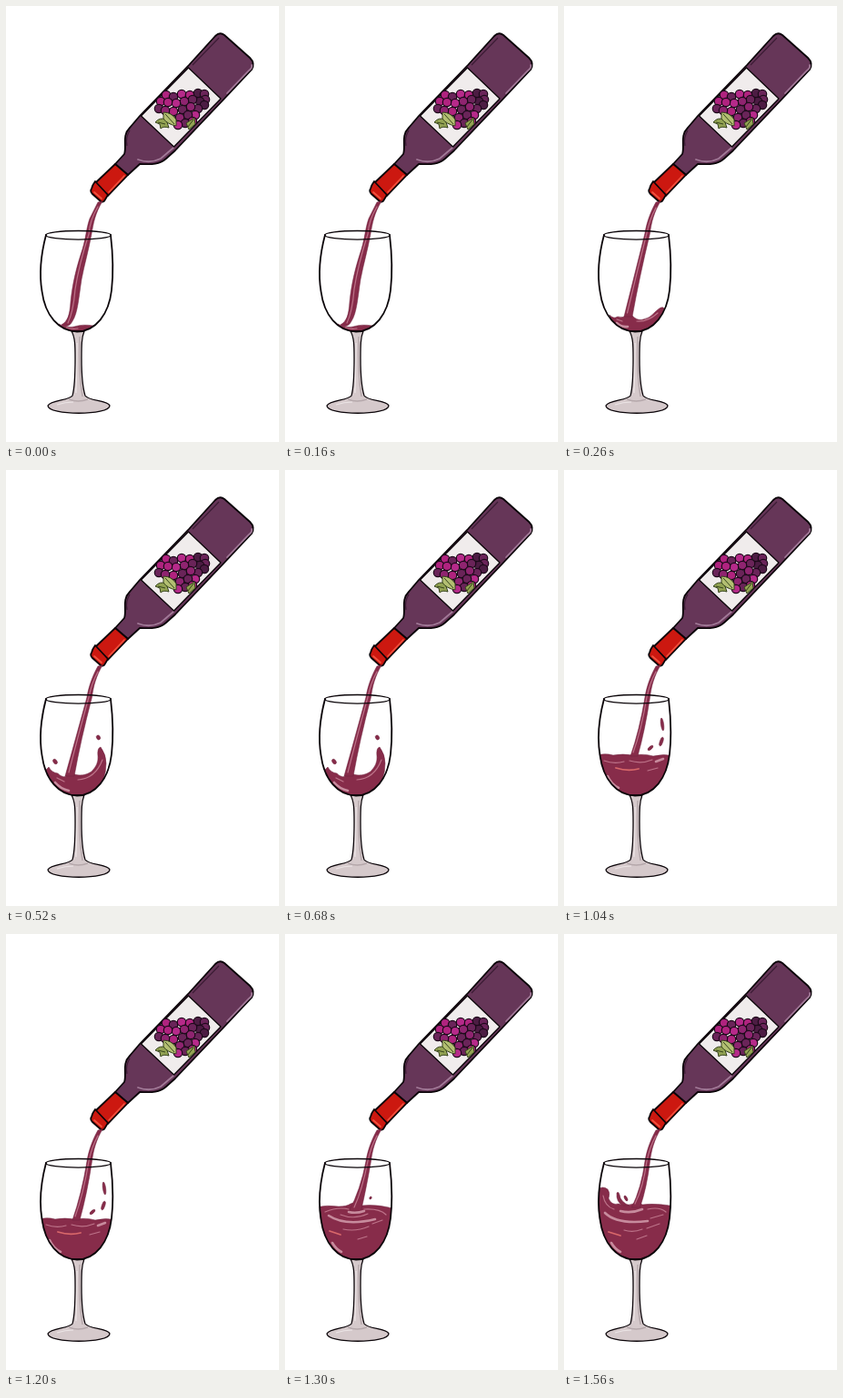
These frames come from a looping animation (300 px wide and 480 px high, 1820 ms). An HTML page:

```html
<!DOCTYPE html>
<html lang="en">
<head>
<meta charset="utf-8">
<title>Pouring wine</title>
<style>
html, body { margin: 0; width: 100%; height: 100%; overflow: hidden; background: #fff; }
svg { display: block; width: 300px; height: 480px; }
.ink { stroke: #0b0509; stroke-width: 1.8; stroke-linejoin: round; stroke-linecap: round; }
.thin { stroke-width: 1.3; }
.line { fill: none; }
.wine { fill: #872c4a; stroke: #6b1d38; stroke-width: .5; }
.sheen, .gloss, .glow { fill: none; stroke: #bd7389; stroke-width: 1.2; stroke-linecap: round; }
.gloss { stroke: #c78b9d; stroke-width: 2.6; }
.glow { stroke: #d9686a; stroke-width: 1.8; }
.pose { visibility: hidden; }
</style>
</head>
<body>
<svg viewBox="0 0 300 480">
  <defs>
    <clipPath id="bowl"><path d="M44 252C38 273 36 296 39 314C43 341 58 358 78 358.500C99 358 113 339 116 313C119 291 117 269 115 252Z"/></clipPath>
  </defs>

  <g id="bottle">
    <path class="ink" fill="#663658" d="M230 33Q235 28 240 32L268 57Q274 63 270 70L240 102L186 159L176 168C167 176 156 174 147 174L134 186L120 174L130 163C133 154 127 143 136 134L147 121L201 65Z"/>
    <path class="line" stroke="#a27a98" stroke-width="1.8" stroke-linecap="round" d="M270 65Q271 68 267 71L243 96M145 169Q158 174 170 168L184 156"/>
    <path class="line" stroke="#3c1c35" stroke-width="1.2" d="M205 65L234 35M136 137Q131 145 133 154"/>
    <path class="ink thin" fill="#f0ecec" d="M200.500 68L236 102L184.500 155L148.500 121Z"/>
    <path class="ink" fill="#cc1810" d="M120 174L134 186L112 209L98 195Z"/>
    <path class="ink" fill="#cc1810" d="M98 193Q95 197 94 201Q92 204 95 207L104 215Q107 217 109 213L112 208Z"/>
    <path class="line" stroke="#f0523f" stroke-width="1.7" stroke-linecap="round" d="M130 187L113 205M97 205L105 212"/>
    <g id="grapes"></g>
    <g stroke="#35421c" stroke-width="1" stroke-linejoin="round">
      <path fill="#93a353" d="M164 128Q169 122 176 125L179 134Q173 132 170 135L169 130Z"/>
      <path fill="#b3bf72" d="M173 117Q182 117 187 125L187 132Q177 130 173 124Z"/>
      <path fill="#93a353" d="M198 129L207 123L208 130L201 136Z"/>
      <path fill="none" d="M175 119L185 130M167 128L175 130M206 125L200 133"/>
    </g>
  </g>

  <g id="poses"></g>

  <g id="glass">
    <path class="ink thin" fill="#d5c9cb" d="M72 358C76 365 76 374 76 388C76 410 75 422 73 429C70 434 49 434 46 440C46 451 114 451 114 440C112 434 91 435 87 429C83 416 83 402 83 388C83 374 83 365 86 358Z"/>
    <path class="line" stroke="#b5a8ab" stroke-width="1.4" d="M81 364C80 389 81 412 84 430M69 433Q79 437 90 433"/>
    <path class="line" stroke="#ece5e6" stroke-width="1.2" d="M78 371L77 426M56 439Q65 436 74 436"/>
    <path class="ink line" d="M44 252C38.500 273 36.500 296 39.500 314C43 341 58 358 78 358.500C99 358 113 339 116 313C118.500 291 117 269 115 252"/>
    <ellipse class="ink thin line" cx="79.5" cy="252.3" rx="35.8" ry="4.8"/>
  </g>
</svg>
<script>
const STEP = 260;

// Grape centres, painted back to front.
const grapes = [
  [176, 98], [184, 100], [193, 97], [202, 98], [211, 96], [218, 97],
  [170, 105], [219, 103], [213, 105], [205, 103], [196, 105], [187, 107], [178, 106],
  [168, 113], [218, 109], [211, 113], [203, 111], [194, 114], [184, 116], [175, 115],
  [208, 120], [200, 120], [191, 123], [182, 125], [205, 127], [197, 129], [189, 131]
];
const dark = ['#4c1c43', '#6a2459'], bright = ['#b0237f', '#8f2470', '#b62a8a'];
document.getElementById('grapes').innerHTML = grapes.map(([x, y], i) => {
  const skin = x > 209 || i % 4 === 1 ? dark[i % 2] : bright[i % 3];
  return `<circle cx="${x}" cy="${y}" r="4.7" fill="${skin}" stroke="#1c0919" stroke-width="1.2"/>`;
}).join('');

const path = (cls, d) => d ? `<path class="${cls}" d="${d}"/>` : '';
const drop = (x, y, rx, ry, turn = 0) =>
  `<ellipse class="wine" cx="${x}" cy="${y}" rx="${rx}" ry="${ry}" transform="rotate(${turn} ${x} ${y})"/>`;

// Falling stream from the bottle mouth to a landing point.
function stream(x, y, w) {
  const l = x - w / 2, r = x + w / 2, mid = (y + 250) / 2 + 4;
  return path('wine', `M101 216L106 215C99 227 96 238 94.500 250Q${x + 12} ${mid} ${r} ${y}` +
    `L${l} ${y}Q${x + 6} ${mid} 89 250C91 237 96 225 101 216Z`) +
    path('sheen', `M101 222Q94 235 91 250Q${x + 8} ${mid} ${x - 1} ${y - 4}`);
}

const poses = [
  {
    flow: path('wine', 'M101 216L106 215C98 228 96 239 94 251C91 268 86 285 83 301C80 320 79 338 73 347C70 353 65 354 61 351C68 347 70 340 71 326C73 306 77 290 82 274C88 257 88 245 92 234Z') +
      path('sheen', 'M101 221Q92 236 91 251C84 273 79 292 76 312Q74 337 68 349'),
    pool: 'M58 350Q67 355 75 353Q84 350 96 352L98 362L58 362Z',
    sheen: 'M66 354Q72 356 79 355'
  },
  {
    flow: stream(70.5, 342, 9),
    pool: 'M50 340Q54 345 59 342Q65 344 69 340L75 341Q81 347 87 345Q94 344 100 337Q108 329 110 333Q108 345 99 354L78 362L55 354Z',
    sheen: 'M80 347Q92 348 103 338M58 345L64 347',
    gloss: 'M58 349Q64 354 70 353'
  },
  {
    flow: stream(70, 337, 10),
    pool: 'M47 327Q50 333 57 334Q64 341 69 335L75 335Q85 338 94 332Q102 324 101 315Q100 306 104 305Q110 313 110 323Q110 342 98 356L78 362L50 352L42 332Z',
    sheen: 'M79 341Q98 340 106 319M56 339L64 343',
    gloss: 'M54 344Q60 351 69 353',
    drops: drop(54, 321, 2, 3, -35) + drop(101.5, 294.5, 2, 2.6, -35)
  },
  {
    flow: stream(73, 331, 6),
    pool: 'M40 326Q46 321 54 325Q66 327 73 331Q86 330 96 323Q109 313 111 301L114 289L122 289L122 362L40 362Z',
    sheen: 'M77 334Q101 332 111 313M86 338L99 333',
    gloss: 'M51 339Q56 348 64 353',
    glow: 'M48 330Q58 329 66 333',
    drops: drop(108, 280, 1.6, 7, -8) + drop(107, 297, 1.7, 3, 8)
  },
  {
    flow: stream(77, 315, 8),
    pool: 'M34 315Q44 311 54 314Q65 312 75 314Q88 312 98 315Q109 312 122 315V362H34Z',
    sheen: 'M44 320Q55 324 66 321M72 320Q85 324 97 319M92 331L103 328',
    gloss: 'M48 337Q52 346 60 350M101 321L109 318',
    glow: 'M57 328Q70 332 82 329',
    drops: drop(108, 280, 1.6, 7, -8) + drop(107, 299, 1.7, 5, 18) + drop(95, 306, 1.6, 3.6, 48)
  },
  {
    flow: stream(77, 305, 13),
    pool: 'M34 301Q46 298 59 300Q68 300 72 297Q78 294 84 299Q101 297 122 303V362H34Z',
    sheen: 'M44 306Q58 300 70 303M87 303Q104 302 111 309M61 309Q76 315 91 308M64 325Q78 328 92 322M96 319L107 315M80 336L90 333',
    gloss: 'M48 310Q66 322 99 314M70 306Q78 308 87 305M52 340Q56 347 62 350',
    glow: 'M49 327L61 331',
    drops: drop(94, 290.5, 1.1, 1.6, 35)
  },
  {
    flow: stream(79, 301, 9),
    pool: 'M34 283Q42 276 48 281Q51 285 49 291Q52 299 60 297Q69 300 76 297Q81 293 86 298Q101 296 122 300V362H34Z',
    sheen: 'M43 288Q45 300 55 303M92 303Q105 300 112 306M95 313L109 309M66 326Q76 329 86 325M91 324L105 319M80 336L91 332',
    gloss: 'M45 307Q58 320 92 316M62 305Q74 308 86 303M52 340Q56 347 62 350',
    glow: 'M49 328L62 332',
    drops: path('wine', 'M58 285Q57 295 65 299L72 299Q62 295 61 287Q60 283 58 285Z') + drop(68, 291, 1.4, 3.2, -28)
  }
];

document.getElementById('poses').innerHTML = poses.map(p =>
  `<g class="pose"><g clip-path="url(#bowl)">${path('wine', p.pool)}</g>${p.flow}<g clip-path="url(#bowl)">` +
  ['sheen', 'gloss', 'glow'].map(cls => path(cls, p[cls])).join('') +
  `</g>${p.drops || ''}</g>`).join('');

const groups = [...document.querySelectorAll('.pose')];
const start = performance.now();

function draw() {
  const now = Math.floor((performance.now() - start) / STEP) % groups.length;
  groups.forEach((g, i) => { g.style.visibility = i === now ? 'visible' : 'hidden'; });
  requestAnimationFrame(draw);
}
draw();
</script>
</body>
</html>
```
